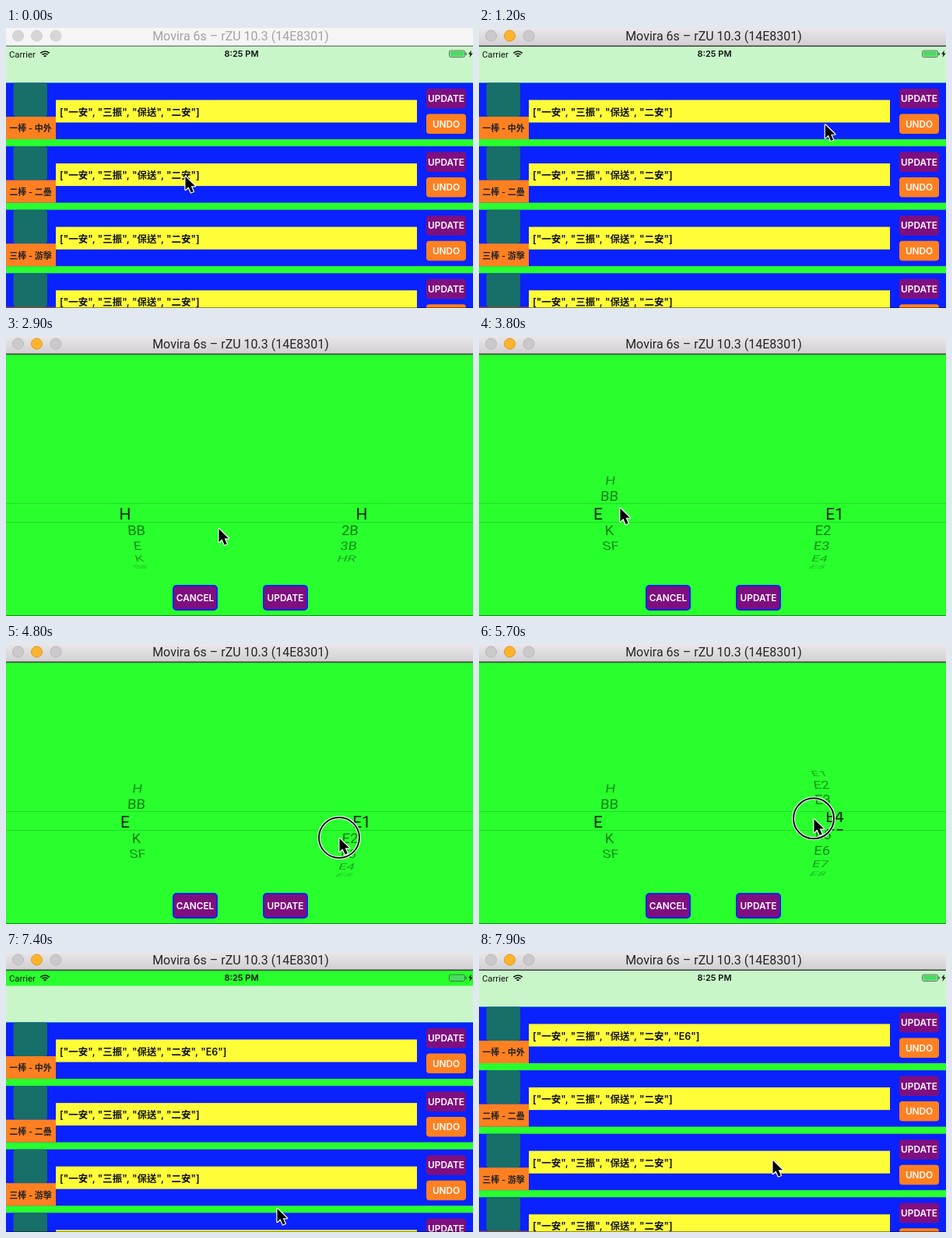
An HTML page with a canvas that plays this animation: 600x360 px, repeating every 8000 ms.

```html
<!DOCTYPE html>
<html lang="zh-Hant">
<head>
<meta charset="utf-8">
<style>
html, body { margin: 0; width: 100%; height: 100%; overflow: hidden; }
canvas { display: block; }
</style>
</head>
<body>
<canvas id="stage" width="600" height="360"></canvas>
<script>
const ctx = document.getElementById('stage').getContext('2d');
const LOOP = 8000;
const GREEN = '#28ff2d', PALE = '#c8f6c9', BLUE = '#0a22fd', YELLOW = '#fffc38';
const ORANGE = '#ff8021', PURPLE = '#7f0f7f', TEAL = '#186e68';
const SANS = 'Inter, "Noto Sans CJK TC", "Noto Sans CJK JP", "Noto Sans CJK", sans-serif';
const TITLE_SANS = 'Roboto, sans-serif';

const BATTERS = ['一棒 - 中外', '二棒 - 二壘', '三棒 - 游擊', '四棒 - 一壘'];
const PLAYS = ['一安', '三振', '保送', '二安'];
const KINDS = ['H', 'BB', 'E', 'K', 'SF'];
const HITS = ['H', '2B', '3B', 'HR'];
const ERRORS = Array.from({ length: 9 }, (_, i) => 'E' + (i + 1));

// Keys are [time, ...values]
const CURSOR = [
  [0, 230, 190], [700, 240, 188], [1550, 563, 86], [2100, 563, 86],
  [2800, 273, 247], [2900, 273, 247], [3150, 168, 264], [3550, 168, 214],
  [4000, 190, 225], [4700, 428, 249], [4800, 428, 249], [5200, 428, 190],
  [5500, 430, 249], [5900, 430, 200], [6150, 430, 205], [6700, 348, 329],
  [7450, 348, 329], [7800, 377, 267]
];
const KIND_SCROLL = [[3150, 0], [3700, 2]];
const ERROR_SCROLL = [[4800, 0], [5400, 3], [5550, 3], [6200, 5]];
const PRESSES = [[1620, 1780], [3150, 3550], [4750, 5200], [5500, 5900], [6930, 7010]];

const clamp = x => Math.max(0, Math.min(1, x));
const easeOut = x => 1 - (1 - clamp(x)) ** 3;

function track(keys, t) {
  let i = 0;
  while (i < keys.length - 2 && t >= keys[i + 1][0]) i++;
  const [a, ...from] = keys[i], [b, ...to] = keys[i + 1];
  const u = clamp((t - a) / (b - a)), e = u * u * (3 - 2 * u);
  return from.map((v, j) => v + (to[j] - v) * e);
}

function rect(x, y, w, h, color) {
  ctx.fillStyle = color;
  ctx.fillRect(x, y, w, h);
}

function rounded(x, y, w, h, r, color) {
  ctx.beginPath();
  ctx.roundRect(x, y, w, h, r);
  ctx.fillStyle = color;
  ctx.fill();
}

function disc(x, y, r, color, edge) {
  ctx.beginPath();
  ctx.arc(x, y, r, 0, 7);
  ctx.fillStyle = color;
  ctx.fill();
  ctx.lineWidth = 1;
  ctx.strokeStyle = edge;
  ctx.stroke();
}

// y is the middle of the capitals
function text(str, x, y, size, color, { weight = 400, align = 'center', font = SANS } = {}) {
  ctx.font = `${weight} ${size}px ${font}`;
  ctx.textAlign = align;
  ctx.fillStyle = color;
  ctx.fillText(str, x, y + size * 0.36);
}

function clipped(x, y, w, h, draw) {
  ctx.save();
  ctx.beginPath();
  ctx.rect(x, y, w, h);
  ctx.clip();
  draw();
  ctx.restore();
}

function titleBar(active) {
  const g = ctx.createLinearGradient(0, 0, 0, 23);
  g.addColorStop(0, active ? '#e9e7e9' : '#f6f6f6');
  g.addColorStop(1, active ? '#d1cfd1' : '#f4f4f4');
  rect(0, 0, 600, 23, g);
  rect(0, 22.5, 600, 1.5, active ? '#3a443a' : '#7c8a7c');
  [15.5, 39.5, 64].forEach((x, i) => {
    const lit = active && i === 1;
    disc(x, 10, 7, lit ? '#fdb32b' : active ? '#cbc9cb' : '#d6d6d6', lit ? '#dd9a2c' : active ? '#b9b7b9' : '#cfcfcf');
  });
  text('Movira 6s – rZU 10.3 (14E8301)', 301.5, 10.5, 16, active ? '#262626' : '#a3a3a3', { font: TITLE_SANS });
}

function statusBar() {
  text('Carrier', 4, 33.5, 11.3, '#111', { align: 'left', font: TITLE_SANS });
  ctx.strokeStyle = '#111';
  ctx.lineWidth = 1.7;
  for (const r of [2, 5, 8]) {
    ctx.beginPath();
    ctx.arc(50, 38, r, -Math.PI * 0.75, -Math.PI * 0.25);
    ctx.stroke();
  }
  text('8:25 PM', 302.5, 33.5, 11, '#111', { weight: 600 });
  ctx.lineWidth = 0.8;
  ctx.strokeStyle = '#3a5a3c';
  ctx.beginPath();
  ctx.roundRect(569.5, 29, 20, 8.5, 2);
  ctx.stroke();
  rounded(570.5, 30, 18, 6.5, 1, '#4cd964');
  rect(590.5, 31.5, 1.2, 3.5, '#3a5a3c');
  ctx.fillStyle = '#111';
  ctx.fill(new Path2D('M598 28.5l-4 5h2.4l-1 4.500 4.300-5.500h-2.600z'));
}

function row(i, y, plays) {
  rect(0, y, 600, 72.5, BLUE);
  rounded(9.5, y, 43.5, 43.5, 4, TEAL);
  rect(0, y + 43.5, 64, 29, ORANGE);
  text(BATTERS[i], 31.5, y + 59, 11, '#222', { weight: 600 });
  rect(64, y + 22, 464, 29, YELLOW);
  text('[' + plays.map(p => `"${p}"`).join(', ') + ']', 69, y + 37.5, 12.5, '#111', { weight: 600, align: 'left' });
  rounded(540, y + 7.5, 51, 25.5, 4, PURPLE);
  text('UPDATE', 565.5, y + 20.5, 11.8, '#fff', { weight: 600 });
  rounded(540, y + 40, 51, 25.5, 4, ORANGE);
  text('UNDO', 565.5, y + 53, 11.8, '#fff', { weight: 600 });
}

function list(top, updated) {
  rect(0, 24, 600, 336, GREEN);
  rect(0, top - 47, 600, 47, PALE);
  for (let i = 0; i < 4; i++) {
    row(i, top + i * 81.6, updated && i === 0 ? [...PLAYS, 'E6'] : PLAYS);
  }
}

// A drum of labels; the selected band is a flat, larger copy
function wheel(items, pos, farX, bandX, top) {
  const mid = top + 204, radius = 74, depth = 840, step = 0.302;
  const drum = () => items.forEach((label, i) => {
    const a = (i - pos) * step;
    if (Math.abs(a) > 1.4) return;
    const c = Math.cos(a), s = depth / (depth + radius * (1 - c));
    ctx.save();
    ctx.translate(300 + (farX - 300) * s, mid + radius * Math.sin(a));
    ctx.transform(s, 0, (300 - farX) / depth * Math.tan(a), s * c, 0, 0);
    ctx.globalAlpha = 0.1 + 0.42 * c;
    text(label, 0, 0, 18.5, '#000', { font: TITLE_SANS });
    ctx.restore();
  });
  const x = Math.min(farX, bandX) - 50;
  clipped(x, mid - 90, 140, 78, drum);
  clipped(x, mid + 12, 140, 78, drum);
  clipped(x, mid - 12, 140, 24, () => items.forEach((label, i) => {
    text(label, bandX, mid + (i - pos) * 24, 21, '#102410', { font: TITLE_SANS });
  }));
}

function modalButton(label, x, y) {
  rounded(x, y, 58, 33, 5, BLUE);
  rounded(x + 2, y + 2, 54, 29, 3, PURPLE);
  text(label, x + 29, y + 17, 11.8, '#fff', { weight: 600 });
}

function modal(top, t) {
  rect(0, top, 600, 336, GREEN);
  rect(0, top + 191, 600, 1, '#23dc28');
  rect(0, top + 215, 600, 1, '#23dc28');
  wheel(KINDS, track(KIND_SCROLL, t)[0], 167, 153, top);
  if (t < 3700) wheel(HITS, 0, 442.5, 457, top);
  else wheel(ERRORS, track(ERROR_SCROLL, t)[0], 442.5, 457, top);
  modalButton('CANCEL', 214, top + 296);
  modalButton('UPDATE', 330, top + 296);
}

function cursor(t) {
  const [x, y] = track(CURSOR, t);
  if (PRESSES.some(([a, b]) => t >= a && t < b)) {
    ctx.beginPath();
    ctx.arc(x, y, 26, 0, 7);
    ctx.strokeStyle = '#fff';
    ctx.lineWidth = 4;
    ctx.stroke();
    ctx.strokeStyle = '#111';
    ctx.lineWidth = 2;
    ctx.stroke();
  }
  ctx.save();
  ctx.translate(x + 0.5, y + 1);
  const arrow = new Path2D('M0 0V17L4 13.300 7.200 20.500 10.300 19.200 7.200 12.200H12.500Z');
  ctx.lineJoin = 'round';
  ctx.strokeStyle = '#fff';
  ctx.lineWidth = 2.4;
  ctx.stroke(arrow);
  ctx.fillStyle = '#000';
  ctx.fill(arrow);
  ctx.restore();
}

function draw(t) {
  const opening = t >= 1833, closing = t >= 7000;
  const shown = closing ? 1 - easeOut((t - 7000) / 390) : easeOut((t - 1833) / 500);
  const top = closing && t < 7500 ? 90.5 : opening && !closing ? 52.5 : 70.5;
  clipped(0, 24, 600, 336, () => {
    if (shown < 1) list(top, closing);
    if (shown > 0) modal(24 + 336 * (1 - shown), t);
    if (!opening || closing) statusBar();
  });
  rect(0, 359, 600, 1, 'rgba(0,0,0,.45)');
  titleBar(t >= 1000);
  cursor(t);
}

const start = performance.now();
function tick() {
  draw((performance.now() - start) % LOOP);
  requestAnimationFrame(tick);
}
tick();
</script>
</body>
</html>
```
